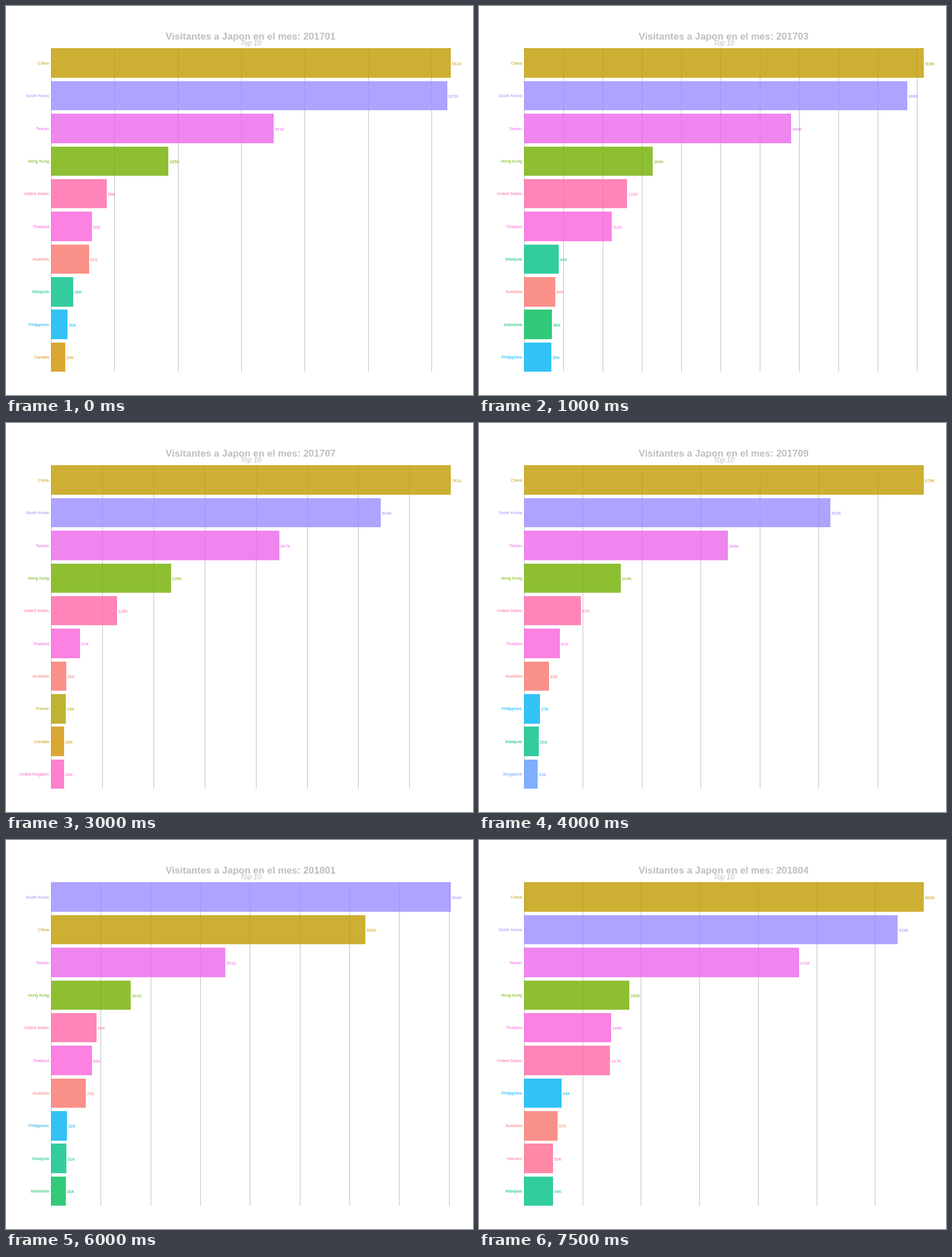
Animation of 820 by 683 pixels, one loop 8000 ms. Source, as an HTML page:

```html
<!DOCTYPE html>
<html lang="es">
<head>
<meta charset="utf-8">
<title>Visitantes a Japon</title>
<style>
html, body { margin: 0; width: 100%; height: 100%; overflow: hidden; background: #fff; }
svg { display: block; font-family: "Liberation Sans", Arial, sans-serif; font-size: 7.35px; }
</style>
</head>
<body>
<svg id="chart" width="820" height="683" viewBox="0 0 820 683"></svg>
<script>
const COUNTRIES = {
  CN: ['China', '#c09b00'], KR: ['South Korea', '#9a8eff'], TW: ['Taiwan', '#ec67eb'],
  HK: ['Hong Kong', '#72b000'], US: ['United States', '#ff67a8'], TH: ['Thailand', '#fa62db'],
  AU: ['Australia', '#f8766d'], MY: ['Malaysia', '#00c087'], PH: ['Philippines', '#00b3f4'],
  CA: ['Canada', '#d39200'], ID: ['Indonesia', '#00bc59'], SG: ['Singapore', '#619cff'],
  FR: ['France', '#afa100'], GB: ['United Kingdom', '#ff61c3'], VN: ['Vietnam', '#ff6c90']
};

// Thousands of visitors per month; a missing count is 7% below the one before it.
const MONTHS = [
  'CN630.6 KR625.4 TW350.8 HK185.3 US87.8 TH64.9 AU60.6 MY34.6 PH26.4 CA22.6',
  'KR600.1 CN509.3 TW342.7 HK151.7 TH79.8 US74.9 AU33.4 MY28.1 PH24.3 ID',
  'CN509 KR488.2 TW340.1 HK164.2 US131 TH111.7 MY43.9 AU39.9 ID35.8 PH34.8',
  'KR554.6 CN528.8 TW424 HK236.9 US131.3 TH123 PH53 AU MY ID',
  'KR558.9 CN517.1 TW407.4 HK181.6 US124.9 TH88.8 PH43.8 MY36.1 SG34.4 AU32.2',
  'CN582.5 KR566.8 TW434.1 HK217 US129 TH65 ID42 SG PH AU29',
  'CN780.8 KR644 TW446.5 HK234.6 US129.4 TH56.6 AU30.4 FR29.1 CA26.1 GB25.9',
  'CN819.7 KR620.9 TW390 HK193 US101 TH47 VN28 FR CA GB',
  'CN678.5 KR520 TW346 HK164 US97 TH61 AU43 PH27 MY SG',
  'CN663.8 KR621.9 TW382.7 HK178.6 US130.5 TH114 AU46 MY PH GB32',
  'KR622.9 CN567.1 TW363.4 HK173 US114.8 TH94.9 MY52.3 SG50.6 PH41.1 AU39',
  'KR678.9 CN564.2 TW349 HK223.6 US110 TH106 SG75 MY69 AU53 ID',
  'KR803.8 CN632.3 TW350.7 HK160.6 US91.6 TH82.6 AU69.8 PH31.7 MY30.6 ID30',
  'CN716.4 KR708.3 TW400.9 HK178 US90 TH81 AU43 PH29 MY GB',
  'KR619.2 CN594.9 TW387.4 HK195.9 US149 TH121 AU54 MY ID PH',
  'CN683.4 KR638.5 TW469.9 HK180 TH148.7 US147.3 PH64.2 AU57.4 VN50.1 MY49.4'
].map(row => {
  let count;
  return row.split(' ').map(item => {
    count = +item.slice(2) || count * 0.93;
    return [...COUNTRIES[item.slice(0, 2)], count];
  });
});

const LEFT = 79, WIDTH = 702, TOP = 74.4, BOTTOM = 642, PITCH = 57.37, BAR = 51.6;
const HOLD = 500;
const chart = document.getElementById('chart');

const rect = (x, y, w, h, fill, opacity = 1) =>
  `<rect x="${x}" y="${y}" width="${w}" height="${h}" fill="${fill}" fill-opacity="${opacity}"/>`;
const text = (x, y, fill, anchor, content, style = '') =>
  `<text x="${x}" y="${y}" fill="${fill}" text-anchor="${anchor}" style="${style}">${content}</text>`;

function draw(month) {
  const rows = MONTHS[month];
  const max = rows[0][2];
  const px = count => Math.round(count / max * WIDTH);
  const step = max < 607 ? 50 : 100;
  let out = '';

  for (let v = 0; v <= max; v += step) out += rect(LEFT + px(v), 74, 1, BOTTOM - 74, '#bebebe');

  rows.forEach(([name, color, count], i) => {
    const y = Math.round(TOP + i * PITCH);
    const end = Math.round(TOP + i * PITCH + BAR);
    const mid = TOP + i * PITCH + BAR / 2;
    out += rect(LEFT, y, px(count), end - y, color, 0.8)
      + text(75.3, mid + 2.7, color, 'end', name)
      + text(LEFT + px(count) + 2, mid + 3.7, color, 'start', Math.round(count) + 'K');
  });

  const date = 201701 + month % 12 + 100 * Math.floor(month / 12);
  out += text(429.5, 59, '#bebebe', 'middle', 'Visitantes a Japon en el mes: ' + date, 'font-weight:bold;font-size:17px')
    + text(430, 69, '#bebebe', 'middle', 'Top 10', 'font-style:italic;font-size:12.2px');
  chart.innerHTML = out;
}

let shown = -1;
const start = performance.now();
function tick() {
  const month = Math.floor((performance.now() - start) / HOLD) % MONTHS.length;
  if (month !== shown) draw(shown = month);
  requestAnimationFrame(tick);
}
tick();
</script>
</body>
</html>
```
